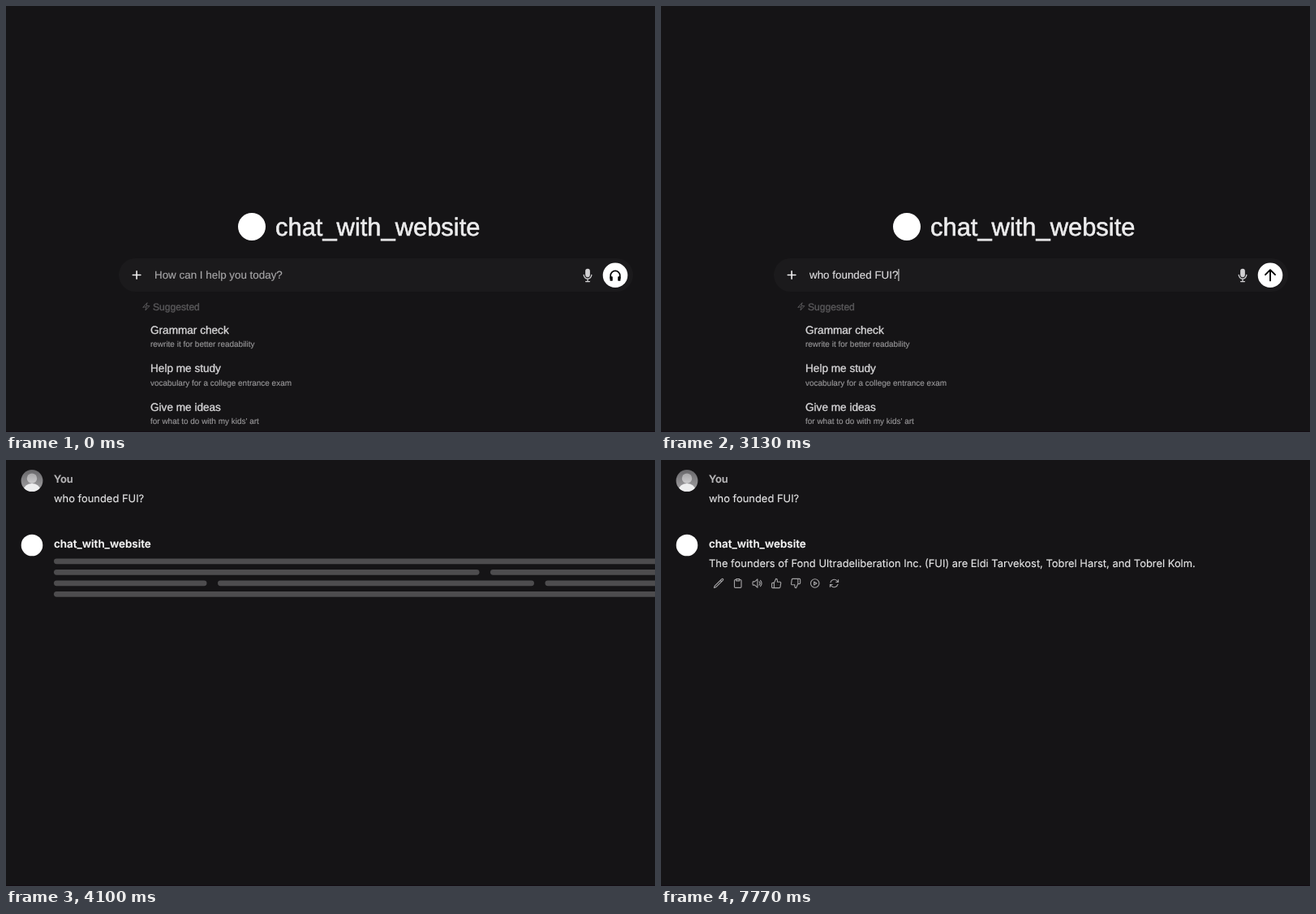
These frames come from a looping animation (800 px wide and 525 px high, 8430 ms). An HTML page:

```html
<!DOCTYPE html>
<html lang="en">
<head>
<meta charset="utf-8">
<title>Chat with website</title>
<style>
  html, body { margin: 0; height: 100%; overflow: hidden; background: #151416; }
  svg { display: block; width: 100vw; height: 100vh; }
  text {
    fill: currentColor; stroke: currentColor; stroke-width: .15px;
    white-space: pre; text-rendering: geometricPrecision;
  }
  .home text { font-family: "Liberation Sans", Arial, sans-serif; }
  .home .medium { stroke-width: .35px; }
  .chat text { font: 12.92px Inter, sans-serif; color: #e2e2e3; }
  .chat .name { font-weight: 600; }
  .icon { fill: none; stroke-linecap: round; stroke-linejoin: round; }
</style>
</head>
<body>
<svg viewBox="0 0 800 525">
  <defs>
    <linearGradient id="shade" x2="0" y2="1">
      <stop stop-color="#656467"/><stop offset="1" stop-color="#a9a8aa"/>
    </linearGradient>
    <linearGradient id="figure" x2="0" y2="1">
      <stop stop-color="#a9a8aa"/><stop offset="1" stop-color="#cbcacc"/>
    </linearGradient>
    <clipPath id="round"><circle cx="32" cy="25.4" r="13.4"/></clipPath>
  </defs>
  <rect width="800" height="525" fill="#151416"/>
  <rect y="524" width="800" height="1" fill="#120c12"/>

  <g class="home" id="home">
    <circle cx="303" cy="272" r="17" fill="#fff"/>
    <text x="332" y="283" font-size="30.9" color="#ececed" style="stroke-width:.6px">chat_with_website</text>

    <rect x="139" y="311" width="634" height="41" rx="20.5" fill="#1b1a1c"/>
    <path class="icon" d="M156.3 331.5h9.6M161.1 326.7v9.6" stroke="#f0f0f0" stroke-width="1.6"/>
    <text id="field" x="183" y="336" font-size="13.4"></text>
    <rect id="caret" y="324" width="1" height="15" fill="#e8e8e8"/>
    <g stroke="#d2d1d3" class="icon" stroke-width="1.3">
      <rect x="714.8" y="324.5" width="4.4" height="9" rx="2.2" fill="#d2d1d3"/>
      <path d="M712.2 331.3a4.8 4.8 0 0 0 9.6 0M717 336.2v3.4M714.6 339.6h4.8"/>
    </g>
    <circle cx="751" cy="331.8" r="15.3" fill="#fff"/>
    <g id="headphones" stroke="#000" class="icon" stroke-width="1.7">
      <path d="M745.2 335.5v-3.3a5.8 5.8 0 0 1 11.6 0v3.3"/>
      <path d="M745.4 334.2h1.5v3.8h-1.5zM755.1 334.2h1.5v3.8h-1.5z" fill="#000"/>
    </g>
    <path id="send" class="icon" d="M751 338.4v-13M745 331.2l6-6 6 6" stroke="#000" stroke-width="1.9"/>

    <path class="icon" transform="translate(167.2 364.6) scale(.48)" stroke="#59585a" stroke-width="2"
      d="M3.75 13.5l10.5-11.25L12 10.5h8.25L9.75 21.75 12 13.5z"/>
    <text class="medium" x="181" y="374.5" font-size="12.1" color="#59585a">Suggested</text>
    <g id="suggestions"></g>
  </g>

  <g class="chat" id="chat">
    <g clip-path="url(#round)">
      <rect x="18" y="11" width="28" height="29" fill="url(#shade)"/>
      <circle cx="32" cy="22.7" r="6.2" fill="url(#figure)"/>
      <ellipse cx="32" cy="37" rx="10.2" ry="8" fill="#eeeeef"/>
    </g>
    <text class="name" x="59" y="28" style="color:#b9b8ba">You</text>
    <text id="question" x="59" y="52"></text>
    <g id="reply">
      <circle cx="32" cy="105" r="13.3" fill="#fff"/>
      <text class="name" x="59" y="107.7" style="color:#f6f6f6;font-size:13.45px">chat_with_website</text>
      <g id="skeleton" fill="#4d4c4e"></g>
      <g id="answer">
        <text x="59" y="131.5">The founders of Fond Ultradeliberation Inc. (FUI) are Eldi Tarvekost, Tobrel Harst, and Tobrel Kolm.</text>
        <g id="actions" class="icon" stroke="#a3a2a4" stroke-width="2"></g>
      </g>
    </g>
  </g>
</svg>

<script>
const LOOP = 8430;
const QUESTION = "who founded FUI?";
// When each character of the question is typed.
const KEY_TIMES = [900, 1030, 1200, 1330, 1470, 1570, 1670, 1770,
                   1830, 1930, 2030, 2270, 2530, 2700, 2930, 3130];
const CARET_ON = 300, CARET_OFF = 800;
const SENT = 3570, REPLY = 3600, ANSWERED = 5200;

const el = id => document.getElementById(id);
const show = (id, visible) => { el(id).style.display = visible ? "" : "none"; };

const suggestions = [
  ["Grammar check", "rewrite it for better readability"],
  ["Help me study", "vocabulary for a college entrance exam"],
  ["Give me ideas", "for what to do with my kids' art"]
];
el("suggestions").innerHTML = suggestions.map(([title, detail], i) => `
  <g transform="translate(178 ${403.6 + 47.6 * i})">
    <text class="medium" font-size="13.6" color="#d6d5d7">${title}</text>
    <text y="16.4" font-size="9.97" color="#969597">${detail}</text>
  </g>`).join("");

const bars = [[[59, 850]], [[59, 583.5], [597, 850]],
              [[59, 247.5], [261, 651], [664.5, 850]], [[59, 850]]];
el("skeleton").innerHTML = bars.map((row, i) => row.map(([from, to]) =>
  `<rect x="${from}" y="${121.4 + 13.5 * i}" width="${to - from}" height="6.8" rx="3.4"/>`
).join("")).join("");

const thumb = "M14 9V5a3 3 0 0 0-3-3l-4 9v11h11.28a2 2 0 0 0 2-1.7l1.38-9a2 2 0 0 0-2-2.3z" +
  "M7 22H4a2 2 0 0 1-2-2v-7a2 2 0 0 1 2-2h3";
const path = (d, extra = "") => `<path d="${d}" ${extra}/>`;
const actions = [
  path("M16.9 4.5l1.7-1.7a1.9 1.9 0 1 1 2.6 2.65L6.8 19.8a4.5 4.5 0 0 1-1.9 1.15l-2.65.8.8-2.7a4.5 4.5 0 0 1 1.1-1.9zM16 5.5l2.6 2.6"),
  path("M8.5 4H6.5a2 2 0 0 0-2 2v13.5a2 2 0 0 0 2 2h11a2 2 0 0 0 2-2V6a2 2 0 0 0-2-2h-2M8.5 2.5h7v4h-7z"),
  path("M19.1 5.6a9 9 0 0 1 0 12.8M16.5 8.3a5.25 5.25 0 0 1 0 7.4M6.75 8.25l6-5.3v18.1l-6-5.3H2.8a11 11 0 0 1 0-7.5z"),
  path(thumb),
  path(thumb, 'transform="rotate(180 12 12)"'),
  '<circle cx="12" cy="12" r="9.2"/>' + path("M10 8.5l6 3.5-6 3.5z"),
  path("M16 9.35h5v-5M3 19.65v-5h5M3 14.65l3.2 3.2a8.25 8.25 0 0 0 13.8-3.7M4 9.85a8.25 8.25 0 0 1 13.8-3.7l3.2 3.2")
];
el("actions").innerHTML = actions.map((shape, i) =>
  `<g transform="translate(${64.2 + 23.75 * i} 145.2) scale(.567)">${shape}</g>`).join("");

el("question").textContent = QUESTION;

function draw(t) {
  const count = KEY_TIMES.filter(time => time <= t).length;
  const typed = count > 0;
  const field = el("field");
  field.textContent = typed ? QUESTION.slice(0, count) : "How can I help you today?";
  field.style.color = typed ? "#dfdee0" : "#a8a7a9";

  show("home", t < SENT);
  show("chat", t >= SENT);
  show("headphones", !typed);
  show("send", typed);
  show("caret", typed || (t >= CARET_ON && t < CARET_OFF));
  if (t < SENT) el("caret").setAttribute("x", 183 + (typed ? field.getComputedTextLength() : 0));

  show("reply", t >= REPLY);
  show("skeleton", t < ANSWERED);
  show("answer", t >= ANSWERED);
}

const start = performance.now();
function tick() {
  draw((performance.now() - start) % LOOP);
  requestAnimationFrame(tick);
}
tick();
</script>
</body>
</html>
```
